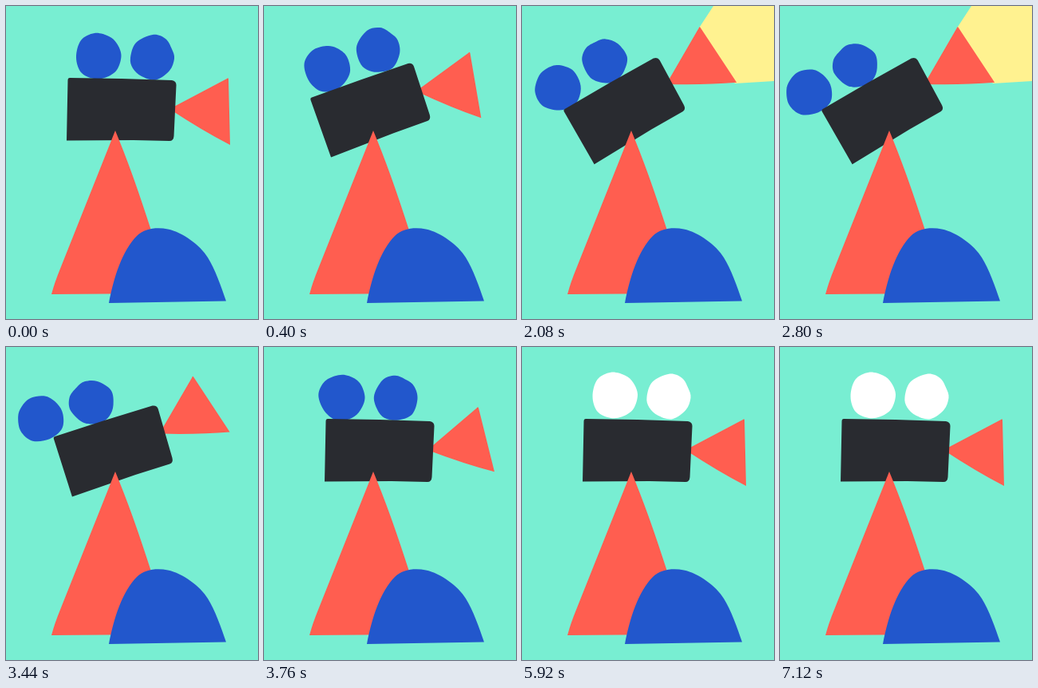
Write an HTML page with a canvas that moves like this. It is 316x392 px and loops after 7.2 s.

```html
<!DOCTYPE html>
<html lang="en">
<head>
<meta charset="utf-8">
<title>Film camera</title>
<style>
html, body { margin: 0; width: 100%; height: 100%; overflow: hidden; background: #78eed2; }
canvas { display: block; }
</style>
</head>
<body>
<canvas id="stage" width="316" height="392"></canvas>
<script>
const ctx = document.getElementById('stage').getContext('2d');
const LOOP = 7200, STEP = 80;
const COLORS = { bg: '#78eed2', blue: '#2257cc', red: '#ff5e50', dark: '#292b30', beam: '#fff290', white: '#ffffff' };
const PIVOT = [137, 157], LENS_TIP = [205, 129];
const CAMERA_TILT = -31, LENS_TILT = -32, ROLL = 46, REEL_RADIUS = 28;

const leftReel = {
  center: [116, 63],
  outline: [[88, 64], [94, 43], [111, 34], [129, 38], [139, 47], [144.5, 62], [139, 80], [125, 89.5], [110, 91], [94, 83]]
};
const rightReel = {
  center: [183.5, 64.5],
  outline: [[156, 65], [163, 46], [184, 36], [200, 41], [208, 54], [211, 66], [205, 81], [188, 92.5], [170, 88], [159, 78]]
};

// Smooth 0..1 ramp between two times.
function ramp(t, start, end) {
  const p = Math.min(1, Math.max(0, (t - start) / (end - start)));
  return p * p * (3 - 2 * p);
}

function polygon(points, color) {
  ctx.beginPath();
  points.forEach(p => ctx.lineTo(...p));
  ctx.closePath();
  ctx.fillStyle = color;
  ctx.fill();
}

// Closed Catmull-Rom curve through the points.
function blob(points, color) {
  const n = points.length, at = i => points[(i + n) % n];
  ctx.beginPath();
  ctx.moveTo(...points[0]);
  for (let i = 0; i < n; i++) {
    const [a, b, c, d] = [at(i - 1), at(i), at(i + 1), at(i + 2)];
    ctx.bezierCurveTo(b[0] + (c[0] - a[0]) / 6, b[1] + (c[1] - a[1]) / 6,
      c[0] - (d[0] - b[0]) / 6, c[1] - (d[1] - b[1]) / 6, c[0], c[1]);
  }
  ctx.fillStyle = color;
  ctx.fill();
}

function rotateAbout([x, y], radians) {
  ctx.translate(x, y);
  ctx.rotate(radians);
  ctx.translate(-x, -y);
}

function isolated(paint) {
  ctx.save();
  paint();
  ctx.restore();
}

function drawReel(reel, slide, white) {
  isolated(() => {
    ctx.translate(white ? 0.5 - slide : -slide, white ? -2.3 : 0);
    rotateAbout(reel.center, -slide / REEL_RADIUS);
    blob(reel.outline, white ? COLORS.white : COLORS.blue);
  });
}

function drawLens() {
  ctx.beginPath();
  ctx.moveTo(...LENS_TIP);
  ctx.lineTo(277, 91);
  ctx.quadraticCurveTo(279, 89, 279, 92);
  ctx.lineTo(281, 174);
  ctx.quadraticCurveTo(246, 156, ...LENS_TIP);
  ctx.fillStyle = COLORS.red;
  ctx.fill();
}

function drawBody() {
  ctx.beginPath();
  ctx.moveTo(80, 90);
  ctx.lineTo(145, 91);
  ctx.lineTo(208, 93);
  ctx.quadraticCurveTo(213.5, 94, 213.5, 99);
  ctx.lineTo(210.5, 163);
  ctx.quadraticCurveTo(210, 169, 205, 169);
  ctx.lineTo(160, 168);
  ctx.lineTo(76, 168.5);
  ctx.lineTo(77.5, 93);
  ctx.quadraticCurveTo(77.5, 90, 80, 90);
  ctx.fillStyle = COLORS.dark;
  ctx.fill();
}

function drawTripod() {
  ctx.beginPath();
  ctx.moveTo(137, 156);
  ctx.bezierCurveTo(152, 192, 166, 231, 182, 281);
  ctx.lineTo(200, 360);
  ctx.lineTo(57, 361);
  ctx.quadraticCurveTo(61, 346, 68, 329);
  ctx.closePath();
  ctx.fillStyle = COLORS.red;
  ctx.fill();
}

function drawHill() {
  ctx.beginPath();
  ctx.moveTo(129, 372);
  ctx.bezierCurveTo(135, 340, 146, 306, 164, 288);
  ctx.bezierCurveTo(174, 278, 190, 277, 203, 279.5);
  ctx.bezierCurveTo(221, 283, 244, 300, 253, 315);
  ctx.bezierCurveTo(262, 329, 270, 352, 276, 369.5);
  ctx.closePath();
  ctx.fillStyle = COLORS.blue;
  ctx.fill();
}

function draw(t) {
  const rad = Math.PI / 180;
  const tilt = CAMERA_TILT * rad * (ramp(t, 80, 600) - ramp(t, 3200, 3760));
  const lensTilt = LENS_TILT * rad * (ramp(t, 240, 720) - ramp(t, 3440, 4000));
  const rolled = Math.min(1, Math.max(0, (t - 80) / 3120));
  const slide = ROLL * rolled * (1 - ramp(t, 3440, 4000));
  const white = t >= 4000;

  ctx.fillStyle = COLORS.bg;
  ctx.fillRect(0, 0, 316, 392);
  if (t >= 720 && t < 3040) {
    polygon([[221, 29], [240, 0], [316, 0], [316, 94], [267, 97]], COLORS.beam);
  }

  isolated(() => {
    rotateAbout(PIVOT, tilt);
    isolated(() => {
      rotateAbout(LENS_TIP, lensTilt - tilt);
      drawLens();
    });
    drawReel(leftReel, slide, white);
    drawReel(rightReel, slide, white);
    drawBody();
  });
  drawTripod();
  drawHill();
}

const start = performance.now();
function tick() {
  const t = (performance.now() - start) % LOOP;
  draw(Math.floor(t / STEP) * STEP);
  requestAnimationFrame(tick);
}
tick();
</script>
</body>
</html>
```
